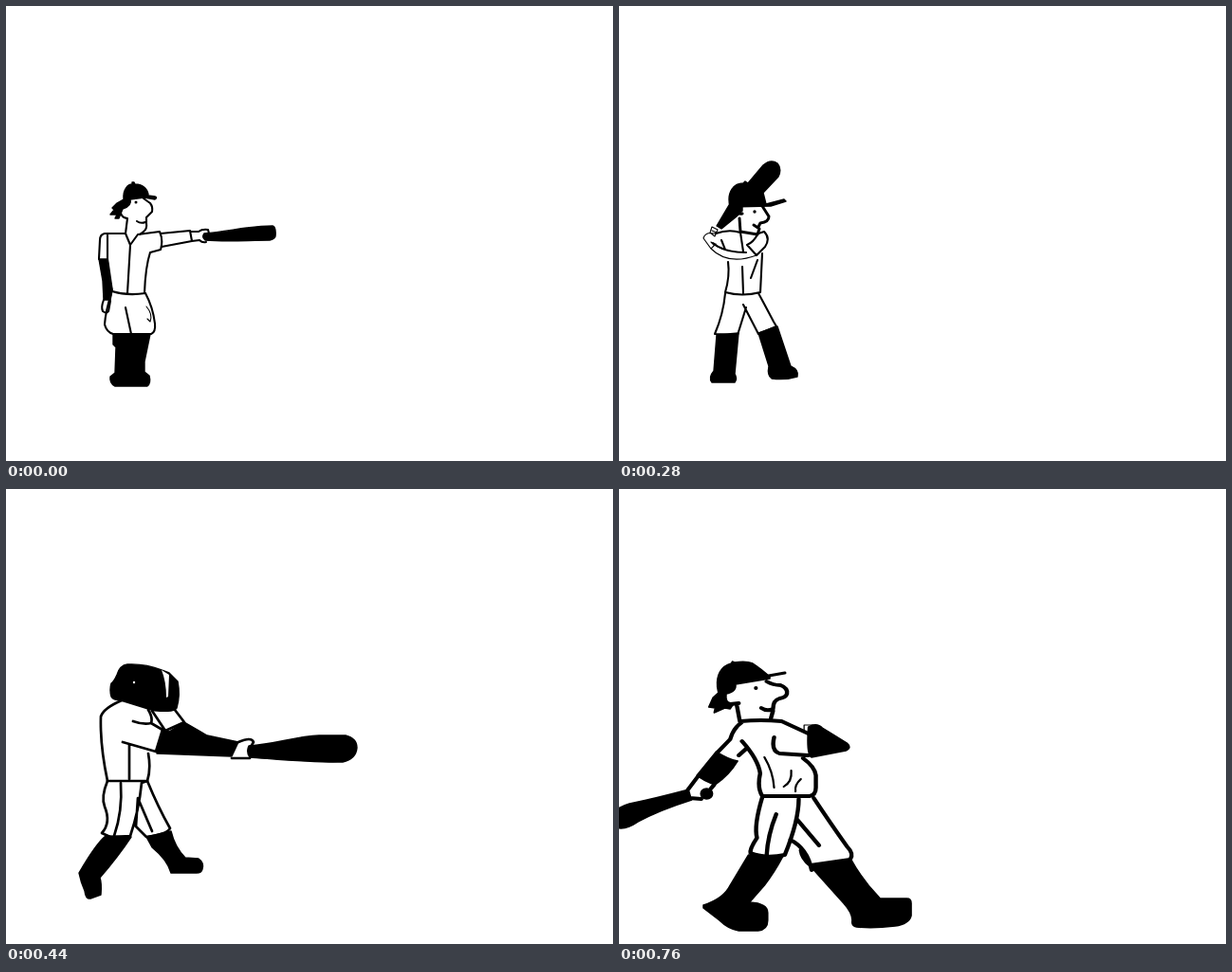
An HTML page for the animation above (0.88 s loop, 640x480 px).

```html
<!DOCTYPE html>
<html lang="en">
<head>
<meta charset="utf-8">
<title>Batter</title>
<style>
  html, body { margin: 0; width: 100%; height: 100%; overflow: hidden; background: #fff; }
  svg { display: block; width: 100%; height: 100%; }
  .pose { visibility: hidden; fill: none; stroke: #000; stroke-width: 2.1; stroke-linecap: round; stroke-linejoin: round; }
  .pose.on { visibility: visible; }
  .ink { fill: #000; stroke-width: 1.4; }
  .gap { fill: #fff; stroke: none; }
  .thin { stroke-width: 1.1; }
  .bold { stroke-width: 3; }
  .heavy { stroke-width: 3.9; }
</style>
</head>
<body>
<svg viewBox="0 0 640 480">
  <!-- pointing the bat -->
  <g class="pose">
    <path class="ink" d="M124 204C123 193 129 188 133 188L133 186H135L136 188C145 188 150 194 150 200L157 201Q160 202 157 204L146 202L131 204Q133 211 123 214L119 224L115 224L117 220L110 220L114 215L112 213L117 208Z"/>
    <path d="M122 213C119 219 123 224 128 224L126 240M145 203L152 208Q155 212 154 217L148 223V228M138 227Q142 230 147 228M148 229Q149 235 145 238L141 241"/>
    <circle class="ink" cx="137" cy="207" r=".8"/>
    <path d="M126 240H104Q99 241 99 247L98 267M107 241V267L112 301M126 240L131 252L139 241L162 238Q166 247 163 257L152 260Q147 275 146 303M131 252L128 303M112 301Q128 306 147 303"/>
    <path d="M163 240L194 237L196 248L164 254M195 238H203Q207 235 213 236L214 240M196 248L204 247Q207 250 211 249"/>
    <path class="ink" d="M209 240C235 238 255 232 281 232Q285 233 284 243Q283 246 278 247C255 247 235 249 210 247Q206 244 209 240Z"/>
    <path class="ink" d="M98 267H107L109 285L112 300L110 310H103L102 290Z"/>
    <path d="M103 310Q100 318 102 322Q106 325 108 322L110 311"/>
    <path d="M111 303Q105 322 104 336Q106 344 113 346H153Q158 344 157 335Q155 318 147 303M126 318L132 346"/>
    <path class="thin" d="M148 317Q155 325 152 333L149 330"/>
    <path class="ink" d="M113 346H152L146 375V386L151 390Q153 398 149 401H115Q109 398 110 391L115 387L116 360L113 357Z"/>
  </g>

  <!-- lowering it -->
  <g class="pose">
    <path class="ink" d="M112 212C110 192 122 185 134 185C147 185 153 195 155 205L178 203Q181 205 178 208L155 211L132 213Q134 219 130 221H122L116 218L111 213Z"/>
    <path class="bold" d="M113 215L104 225M117 217L110 226M121 220L117 227"/>
    <path class="bold" d="M122 220Q123 227 130 226L132 240L146 241L149 235L143 233M150 211L158 219Q160 226 153 229L146 231L149 235"/>
    <path class="thin" d="M131 241L107 242Q99 247 99 257Q102 266 107 272L108 304M109 244Q102 248 104 262M107 247L125 267M117 250L131 266M147 246L136 261M141 250L148 263M124 265L134 263L141 267M124 266L126 274L134 275L143 274M131 265L134 273M152 279L147 303M154 280L150 296"/>
    <path d="M148 242L157 253L156 260"/>
    <path class="ink" d="M142 268L140 271L143 275C170 279 200 280 245 278Q261 276 260 267Q259 259 246 258C215 258 180 264 142 268Z"/>
    <path class="thin" d="M207 281Q230 284 254 278"/>
    <path class="bold" d="M109 303Q128 307 147 304M109 304Q115 315 107 333L100 347H126Q130 333 136 317L148 349L172 339Q158 325 147 305M135 317L131 322M147 318L154 334"/>
    <path class="thin" d="M118 328L116 347"/>
    <path class="ink" d="M103 348L127 347L123 372V384L124 397H97Q92 394 95 388Q105 382 104 372Z"/>
    <path class="ink" d="M149 348L170 341L178 378L188 382Q192 388 187 393Q175 397 160 394Q155 391 157 378Z"/>
  </g>

  <!-- bat over the shoulder -->
  <g class="pose">
    <path class="ink" d="M136 187L152 168Q160 161 167 166Q172 172 168 180L152 197L155 209L174 204L176 206L160 211L117 212C113 195 122 187 131 187L133 185Z"/>
    <path class="ink" d="M116 210L103 232L108 235L124 222L130 216V212Z"/>
    <path class="bold" d="M124 214Q125 220 130 219M127 224L128 238L146 241L148 235L142 231M151 211L158 222Q158 228 149 229L147 233"/>
    <circle class="ink" cx="143" cy="217" r="1"/>
    <path class="thin" d="M98 233L104 236L101 243L96 239ZM98 237L103 239M101 240Q91 238 89 245L97 256L102 251M97 249L100 252M97 256Q115 274 145 263"/>
    <path d="M102 240Q116 235 128 239L131 259M99 250Q110 260 134 260M108 247L112 257M147 240L153 238Q160 245 154 254L145 263L135 252Q142 249 146 241"/>
    <path d="M115 270Q117 285 112 302Q130 307 149 302L151 261M130 275L131 303M146 268L139 287"/>
    <path d="M112 303Q110 325 101 346L125 347L134 318M131 315L147 346L166 338L163 333Q153 314 147 303"/>
    <path class="ink" d="M103 347L126 345L122 388Q125 393 122 397H98Q94 392 100 385Z"/>
    <path class="ink" d="M147 345L167 338L181 380Q190 384 188 391Q175 395 161 393Q156 390 158 380Z"/>
  </g>

  <!-- swing -->
  <g class="pose">
    <path class="ink" d="M111 219Q109 212 111 205Q114 203 117 196Q120 186 128 185Q147 184 164 191L172 194L181 203Q184 218 180 231Q177 235 167 234Q158 235 150 232L121 223Q113 223 111 219Z"/>
    <path class="gap" d="M164 191L172 196L171 219L169 220Q169 203 164 191Z"/>
    <circle class="gap" cx="135" cy="204" r="1.2"/>
    <g stroke-width="2.7">
      <path d="M122 223Q103 231 100 240Q99 270 107 308H149Q153 295 150 279M123 267L158 277L165 254L153 247Q145 249 134 245M130 269V306M150 233Q155 241 153 247M154 234L168 255L188 246L178 233"/>
      <path d="M245 267Q259 261 261 267L258 272M238 284H257"/>
      <path d="M107 308Q100 325 104 335Q111 352 101 363L110 367L131 366Q140 340 143 310M121 310Q123 340 114 366M143 310L149 308Q160 335 173 358Q170 364 148 367L137 356L139 326L154 361"/>
    </g>
    <path class="ink" d="M165 254L172 256L188 246L212 260L245 267L238 282L159 279Z"/>
    <path class="ink" d="M256 271C285 269 305 261 330 260H358Q370 263 370 273Q369 285 355 288C325 289 285 285 257 283Q253 277 256 271Z"/>
    <path class="ink" d="M105 366Q95 374 77 405Q79 415 83 424Q84 433 89 432L100 428Q101 416 99 410Q118 388 132 367Z"/>
    <path class="ink" d="M148 367L174 361Q178 378 189 389L203 390Q209 394 207 401Q206 405 201 405H174Q170 391 154 378Z"/>
  </g>

  <!-- follow through -->
  <g class="pose">
    <g id="follow">
      <path class="ink" d="M110 209C109 197 113 187 123 184L124 182L126 183Q137 181 143 184Q150 189 159 198V200L127 206Q128 214 118 216L115 222L118 225L125 227L122 232L117 231L107 236L108 231L102 230L106 220L111 215Z"/>
      <path class="bold" d="M158 197L173 194"/>
      <g class="heavy">
        <path d="M117 216Q116 226 122 227L130 226M128 227L131 245M156 203Q162 207 169 207Q176 210 175 216Q174 220 168 221Q162 223 162 232Q156 235 151 231M162 234L160 242"/>
        <path d="M132 245Q150 243 170 245L195 258M133 246Q125 252 122 264L110 278M130 281L137 274M133 266Q148 285 150 300Q147 315 152 324H196Q202 323 202 315V302Q201 293 190 284M163 262Q160 276 168 279L195 281"/>
        <path d="M92 303L82 318L84 326L95 327M107 312L104 316"/>
        <path d="M152 325Q144 355 147 368Q140 380 141 384Q155 390 173 386Q186 350 186 327M165 343Q157 365 156 387M200 326Q214 350 231 377Q238 385 234 391L197 397Q189 390 188 381M184 348L205 376M178 370Q194 379 198 402"/>
      </g>
      <circle class="ink" cx="146" cy="210" r="1.2"/>
      <path class="thin" d="M191 256V249H201"/>
      <path class="ink" d="M195 251Q203 246 208 252L231 268Q236 273 230 276L198 283Q193 281 195 251Z"/>
      <path stroke-width="2" d="M154 283Q162 298 163 315M179 297Q180 309 172 314M188 306Q182 312 183 319"/>
      <path class="ink" d="M109 277Q120 285 129 287Q121 302 108 312Q97 308 91 302Z"/>
      <circle class="ink" cx="100" cy="321.5" r="5.5"/>
      <path class="ink" d="M80 318L86 328Q55 339 36 351Q27 358 20 358C12 358 10 349 12 343Q16 336 28 332Q50 327 80 318Z"/>
      <path class="ink" d="M139 386L171 388Q163 405 154 418L140 436Q157 437 157 447V455Q157 465 148 466H130Q120 464 112 455L97 442V439Q116 432 122 418Z"/>
      <path class="ink" d="M197 398L235 391Q245 412 262 432L287 432Q291 432 291 437V450Q289 459 276 461Q255 464 240 462Q235 461 236 455Q236 447 228 437Z"/>
    </g>
  </g>

  <!-- the same stance, stretched sideways -->
  <g class="pose"><use href="#follow" transform="matrix(1.129 0 0 1 -20.5 0)"/></g>
</svg>
<script>
  const poses = document.querySelectorAll('.pose');
  const ends = [120, 280, 440, 600, 760, 880];
  const loop = ends[ends.length - 1];

  function render(ms) {
    const now = ends.findIndex(end => ms % loop < end);
    poses.forEach((pose, i) => pose.classList.toggle('on', i === now));
  }

  function tick() {
    render(performance.now());
    requestAnimationFrame(tick);
  }
  tick();
</script>
</body>
</html>
```
